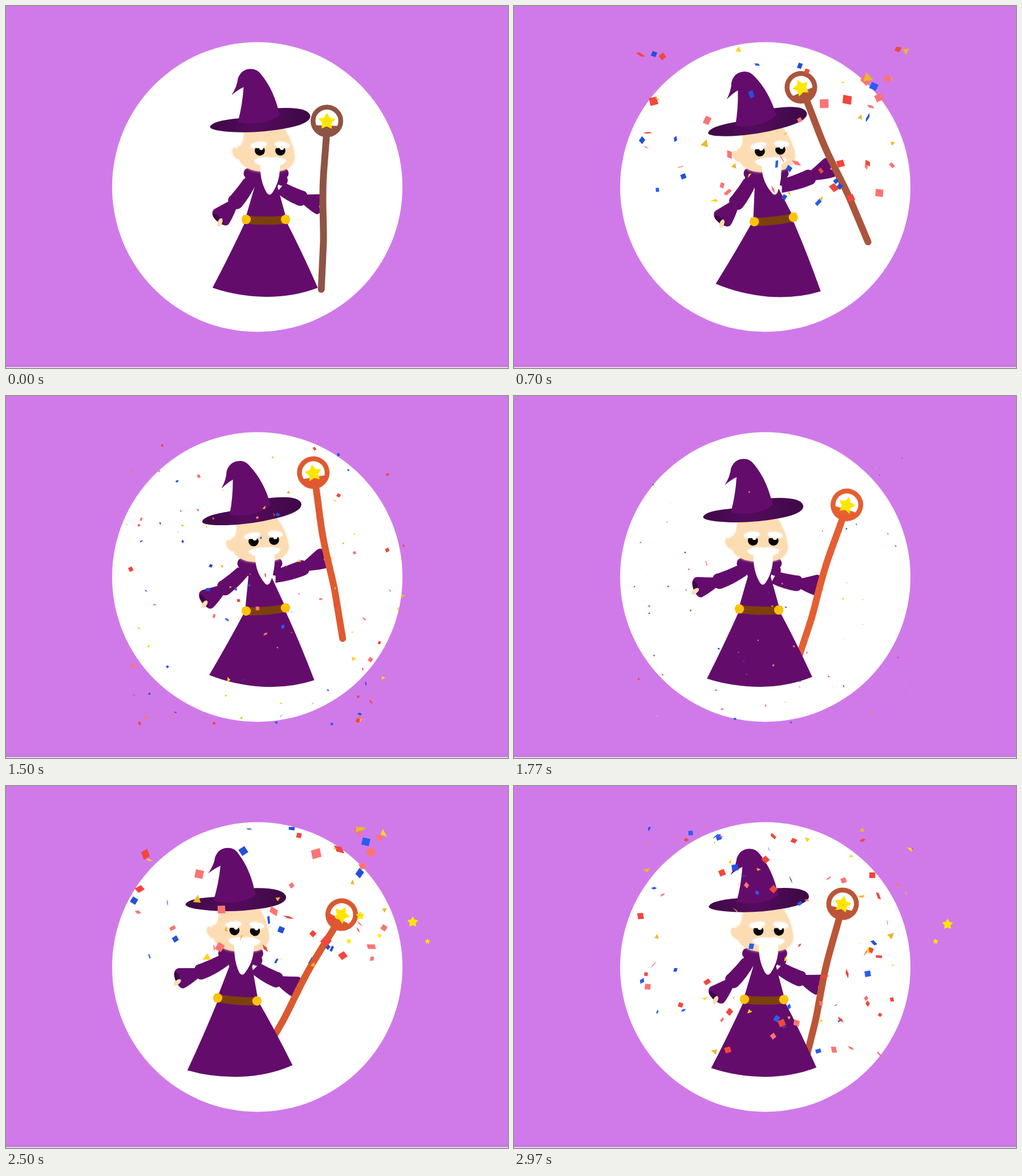
An HTML page with a canvas for the animation above (3.01 s loop, 880x636 px).

```html
<!DOCTYPE html>
<html lang="en">
<head>
<meta charset="utf-8">
<title>Wizard</title>
<style>
html, body { margin: 0; width: 100%; height: 100%; overflow: hidden; background: #d07ae9; }
canvas { display: block; }
</style>
</head>
<body>
<canvas id="stage" width="880" height="636"></canvas>
<script>
const c = document.getElementById('stage').getContext('2d');
const LOOP = 3010, TAU = Math.PI * 2, DEG = Math.PI / 180;
const ROBE = '#640c6c', DARK = '#3d0945', SKIN = '#fcdcb2';
const PAPER = [['#f2463c', '#fb7474'], ['#ffd21f', '#e8b92a'], ['#2a5cf0', '#2450d8']];

// Key poses: time, body x, skirt lean, head shift, left arm angle, wand x, y and angle
const POSES = [
  [0, 455.5, 0, 0, 128, 562.5, 202, 91.9],
  [700, 455.5, 4.1, -14, 125.5, 503, 143, 66.6],
  [1170, 456, 6, -21.5, 125, 457, 125, 55],
  [1500, 455.5, 2.8, -11, 141, 538.5, 134.5, 79.9],
  [2100, 405.5, -4, 8, 171, 612, 243, 129.3],
  [2500, 405.5, -2.8, 5.5, 156.5, 588.5, 226, 119.2],
  [2970, 438.5, -0.3, 0.5, 132, 576, 207, 103.3]
];

// Sparkles shed by the wand, in order of appearance: x, y, radius
const SPARKS = [[567, 253, 8], [655, 263, 5], [601, 273, 5], [621, 228, 8], [713, 239, 10], [739, 273, 5], [760, 243, 10]];

const rand = n => { const v = Math.sin(n * 127.1 + 11.7) * 43758.5453; return v - Math.floor(v); };

// Near pieces are larger and fall faster
const pieces = Array.from({ length: 130 }, (_, i) => {
  const r = k => rand(i + 200 * k), rate = 24 + 30 * r(1) ** 1.5;
  return {
    x: 202 + 496 * r(2), y: 345 - 590 * r(3) ** 1.2, rate, size: rate * 0.29,
    kind: [0, 1, 0, 2][i % 4], spin: r(4), tilt: r(5), turn: r(6)
  };
});

function slope(i, k) {
  if (i < 1 || i > POSES.length - 2) return 0;
  const [a, b, d] = POSES.slice(i - 1, i + 2);
  return (d[k] - b[k]) * (b[k] - a[k]) <= 0 ? 0 : (d[k] - a[k]) / (d[0] - a[0]);
}

// Cubic through the keys, at rest on every turning point
function sample(k, t) {
  const i = POSES.findIndex(p => p[0] > t) - 1;
  if (i < 0) return POSES[POSES.length - 1][k];
  const a = POSES[i], b = POSES[i + 1], d = b[0] - a[0], s = (t - a[0]) / d;
  return a[k] + (b[k] - a[k]) * s * s * (3 - 2 * s)
    + d * s * (1 - s) * (slope(i, k) * (1 - s) - slope(i + 1, k) * s);
}

function poseAt(t) {
  const [body, lean, shift, arm, wandX, wandY, wandA] = [1, 2, 3, 4, 5, 6, 7].map(k => sample(k, t));
  const headX = body + 7.5 + shift;
  return { body, lean, headX, headA: shift * 0.35, neck: headX - 8, arm, wandX, wandY, wandA };
}

function at(x, y, deg, draw) {
  c.save();
  c.translate(x, y);
  c.rotate(deg * DEG);
  draw();
  c.restore();
}

function fill(color, path) {
  c.fillStyle = color;
  c.beginPath();
  path();
  c.fill();
}

const oval = (color, x, y, rx, ry = rx, a = 0) =>
  fill(color, () => c.ellipse(x, y, rx, ry, a * DEG, 0, TAU));

const shape = (color, d) => { c.fillStyle = color; c.fill(new Path2D(d)); };

function star(x, y, r) {
  fill('#ffe600', () => {
    for (let i = 0; i < 10; i++) {
      const a = i * TAU / 10 - TAU / 4, q = i % 2 ? r * 0.55 : r;
      c.lineTo(x + q * Math.cos(a), y + q * Math.sin(a));
    }
  });
}

function backdrop() {
  c.fillStyle = '#d07ae9';
  c.fillRect(0, 0, 880, 636);
  const g = c.createLinearGradient(0, 627, 0, 634);
  g.addColorStop(0, '#d07ae9');
  g.addColorStop(1, '#c478da');
  c.fillStyle = g;
  c.fillRect(0, 627, 880, 7);
  c.fillStyle = '#f3eaf6';
  c.fillRect(0, 634.5, 880, 2);
  oval('#fff', 440.5, 318, 254.5);
}

function arm(x, y, length, deg, flip) {
  at(x, y, deg, () => {
    c.scale(length / 98, flip);
    shape(ROBE, 'M0 13 Q28 19 50 18 Q57 18 60 13 Q78 18 90 19 Q98 18 98 4 Q99 -8 95 -13 Q90 -19 84 -17 Q70 -11 58 -6 Q54 -11 46 -9 Q26 -8 8 -9Z');
    oval(DARK, 94, -1, 4.5, 12, -8);
    oval(SKIN, 97, 5, 8, 4, 15);
  });
}

function arms(p) {
  arm(p.neck - 26, 303, 95, p.arm, -1);
  const x = p.neck + 24, y = 316, a = p.wandA * DEG;
  const dx = p.wandX + 149 * Math.cos(a) - x, dy = p.wandY + 149 * Math.sin(a) - y;
  arm(x, y, Math.hypot(dx, dy), Math.atan2(dy, dx) / DEG, 1);
}

function torso({ body, neck }) {
  for (const side of [-1, 1]) {
    oval(ROBE, neck + 1 + side * 30, 294, 9.5);
    oval(ROBE, neck + 1 + side * 28, 306, 10);
  }
  shape(ROBE, `M${neck - 33} 288 H${neck + 35} L${neck + 21} 317 L${body + 36} 374 H${body - 36} L${neck - 19} 317Z`);
}

function head({ headX, headA }) {
  at(headX, 254, headA, () => {
    c.shadowColor = SKIN;
    c.shadowBlur = 4;
    shape(SKIN, 'M-44 -34 Q-54 -18 -57 -3 Q-67 -8 -66 3 Q-63 14 -54 15 Q-49 28 -32 34 Q-5 41 22 35 Q40 30 43 13 Q41 -14 25 -38Z');
    c.shadowColor = '#fff';
    oval('#fff', -52, -20, 4, 12, 15);
    oval('#fff', -20, -10, 14, 5, -8);
    oval('#fff', 21, -10, 13, 5, 8);
    c.shadowBlur = 0;
    for (const x of [-18, 18]) {
      fill('#080306', () => c.arc(x, 0, 8.8, -0.5, Math.PI + 0.5));
      oval('#fff', x + 2.5, -4.5, 3.6, 3.4);
    }
    c.shadowBlur = 3;
    shape('#fff', 'M0 13 Q-15 10 -28 17 Q-25 27 -5 26 L5 26 Q25 27 28 17 Q15 10 0 13Z');
  });
  const top = headX - headA * 0.5, tip = headX - 1 - headA * 1.8;
  shape('#fff', `M${top - 17} 274 Q${top - 19} 306 ${tip - 5} 328 Q${tip} 335 ${tip + 5} 328 Q${top + 19} 306 ${top + 17} 274Z`);
}

function hat({ headX, headA }) {
  at(headX - 17.5 + headA, 200.5 - headA * 0.6, headA * 1.05, () => {
    const g = c.createLinearGradient(-88, 0, 88, 0);
    g.addColorStop(0, DARK);
    g.addColorStop(0.45, '#540b5d');
    g.addColorStop(1, DARK);
    shape(g, 'M-88 12 Q-85 1 -38 -3 L30 -21 Q85 -24 88 -7 Q88 7 42 15 Q-2 23 -45 21 Q-86 19 -88 12Z');
    shape(ROBE, 'M-39 3 Q-31 -26 -29 -58 Q-38 -54 -50 -44 Q-40 -60 -39 -73 Q-33 -90 -16 -90 Q-5 -90 2 -80 Q25 -52 34 -9 Q18 4 -10 6 Q-32 6 -39 3Z');
  });
}

function wand({ wandX, wandY, wandA }, t) {
  const heat = Math.sin(Math.PI * t / 3900) ** 2, gold = Math.exp(-(((t - 2100) / 180) ** 2));
  const wood = `hsl(${14 + 19 * gold} ${36 + 42 * heat}% ${41 + 14 * heat}%)`;
  at(wandX, wandY, wandA - 90, () => {
    c.strokeStyle = wood;
    c.lineCap = 'round';
    c.lineWidth = 12;
    c.stroke(new Path2D('M0 28 C-1 60 -3 85 -3 112 C-3 155 1 185 1 215 L0 296'));
    oval('#fff', 0, 0, 22);
    c.lineWidth = 8.5;
    c.beginPath();
    c.arc(0, 0, 24.3, 0, TAU);
    c.stroke();
    fill(wood, () => c.arc(0, 0, 21, 0.4, Math.PI - 0.4));
    c.globalAlpha = gold;
    oval('#ffe600', 0, 3, 16);
    c.globalAlpha = 1;
    star(0, 1, 15.5);
  });
}

function skirt({ body, lean }) {
  at(body, 375, lean, () =>
    shape(ROBE, 'M-35 2 H35 Q63 56 91 120 Q50 136 0 136 Q-50 135 -93.5 120 Q-62 60 -35 2Z'));
  at(body, 375, lean * -1.6, () => {
    shape('#7c400b', 'M-40 -7 Q0 -3 40 -7 V7 Q0 12 -40 7Z');
    oval('#ffc20a', -34.5, 0, 8.2);
    oval('#ffc20a', 34.5, 0, 8.2);
  });
}

function confetti(u) {
  if (u < -0.62 || u > 1.35) return;
  const shrink = 1 - 0.5 * u - 0.16 * u * u, drop = 8 * u + 3 * u * u;
  c.save();
  c.beginPath();
  c.rect(190, 72, 520, 508);
  c.clip();
  for (const q of pieces) {
    const s = q.size * shrink, flip = Math.cos(q.spin * TAU + u * 5);
    at(q.x, q.y + q.rate * drop, 360 * q.tilt + 90 * u, () => {
      c.scale(1, Math.max(0.12, Math.abs(flip)));
      c.rotate(q.turn * TAU);
      fill(PAPER[q.kind][flip < 0 ? 1 : 0], () => {
        if (q.kind === 1) {
          c.moveTo(0, -s * 0.6);
          c.lineTo(s * 0.55, s * 0.45);
          c.lineTo(-s * 0.55, s * 0.45);
        } else c.rect(-s / 2, -s / 2, s, s);
      });
    });
  }
  c.restore();
}

function sparkle(t) {
  SPARKS.forEach(([x, y, r], i) => {
    const age = t - 1800 - 120 * i, size = Math.min(1, age / 80, (650 - age) / 80);
    if (size > 0) star(x, y, r * size);
  });
}

function frame() {
  const t = performance.now() % LOOP, p = poseAt(t);
  backdrop();
  arms(p);
  torso(p);
  head(p);
  hat(p);
  wand(p, t);
  skirt(p);
  confetti((t - 700) / 1000);
  confetti((t - 2630) / 1000);
  sparkle(t);
  requestAnimationFrame(frame);
}
frame();
</script>
</body>
</html>
```
